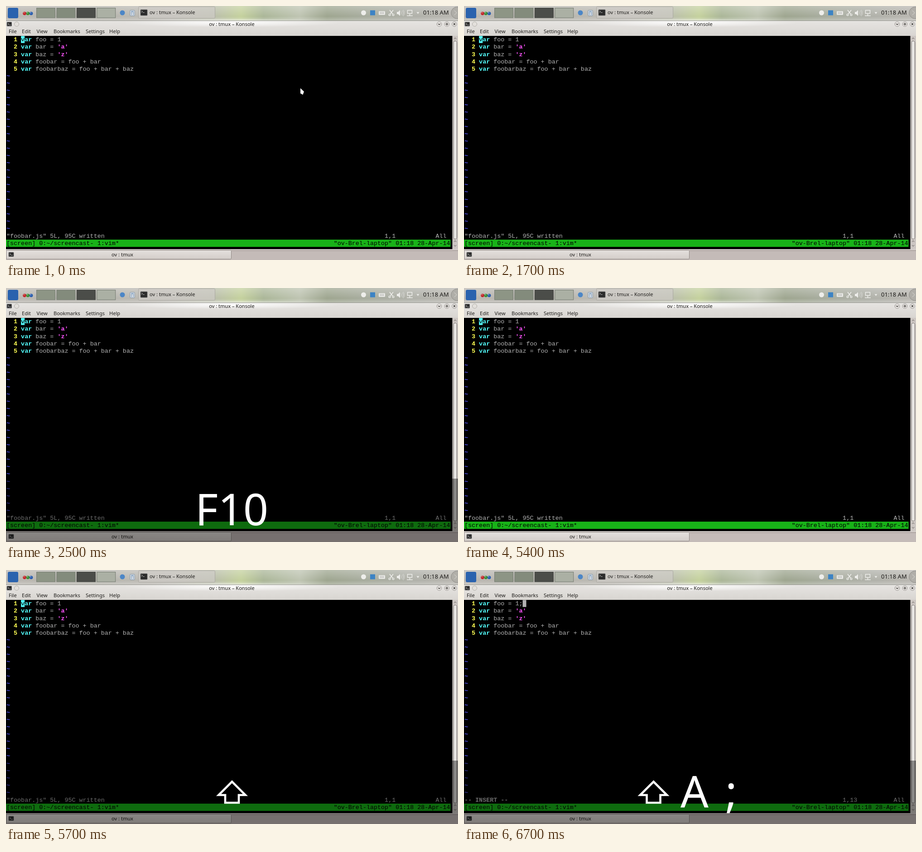
Write an HTML page that moves like this. It is 998 by 561 pixels and loops after 8 s.

```html
<!DOCTYPE html>
<html lang="en">
<head>
<meta charset="utf-8">
<title>Terminal screencast</title>
<style>
  html, body { margin: 0; width: 100%; height: 100%; overflow: hidden; background: #000; }
  svg { display: block; width: 100vw; height: 100vh; }
  text { white-space: pre; }
  .ui { font: 11.05px "Noto Sans", "Open Sans", sans-serif; fill: #1c1a18; }
  .term { font: 13.383px "Liberation Mono", "DejaVu Sans Mono", monospace; fill: #b2b2b2; }
  .key { font: 97px "Noto Sans", "Open Sans", sans-serif; fill: #fff; }
  .b { font-weight: bold; }
</style>
</head>
<body>
<svg id="stage" viewBox="0 0 998 561" preserveAspectRatio="none">
  <defs>
    <linearGradient id="panel">
      <stop offset="0" stop-color="#b9b5af"/>
      <stop offset=".2" stop-color="#b5b4ac"/>
      <stop offset=".36" stop-color="#bdbab4"/>
      <stop offset=".46" stop-color="#b9bda9"/>
      <stop offset=".52" stop-color="#c3d09b"/>
      <stop offset=".57" stop-color="#a9b596"/>
      <stop offset=".65" stop-color="#bdc3b0"/>
      <stop offset=".71" stop-color="#9ca48d"/>
      <stop offset=".79" stop-color="#a5aa9b"/>
      <stop offset=".9" stop-color="#aeafa7"/>
      <stop offset="1" stop-color="#b9b6b0"/>
    </linearGradient>
    <linearGradient id="shade" x2="0" y2="1">
      <stop offset="0" stop-color="#fff" stop-opacity=".28"/>
      <stop offset=".7" stop-color="#fff" stop-opacity=".02"/>
      <stop offset="1" stop-color="#fff" stop-opacity=".3"/>
    </linearGradient>
    <linearGradient id="frame" x2="0" y2="1">
      <stop offset="0" stop-color="#e6e4e1"/>
      <stop offset="1" stop-color="#d8d5d1"/>
    </linearGradient>
    <radialGradient id="glow">
      <stop offset="0" stop-color="#fff" stop-opacity=".9"/>
      <stop offset="1" stop-color="#fff" stop-opacity="0"/>
    </radialGradient>
    <linearGradient id="tab" x2="0" y2="1">
      <stop offset="0" stop-color="#e4e0dd"/>
      <stop offset="1" stop-color="#d3cdc9"/>
    </linearGradient>
    <linearGradient id="slider">
      <stop offset="0" stop-color="#d8d4d0"/>
      <stop offset=".5" stop-color="#f0eeec"/>
      <stop offset="1" stop-color="#d2cdc8"/>
    </linearGradient>
  </defs>
  <g id="desk"></g>
  <g id="term"></g>
  <path id="pointer" d="M650 181.500L658 189 655.500 196 650 193Z" fill="#f4f4f4"/>
  <g id="keys"></g>
</svg>
<script>
const LOOP = 8000;
const COL = 8.03, ROW = 16.05;
const YELLOW = '#ffff54', CYAN = '#54ffff', PINK = '#ff54ff', BLUE = '#5454ff', GREY = '#b2b2b2';
const $ = id => document.getElementById(id);

function add(parent, tag, attrs, content) {
  const el = document.createElementNS('http://www.w3.org/2000/svg', tag);
  for (const k in attrs) el.setAttribute(k, attrs[k]);
  if (content !== undefined) el.textContent = content;
  parent.appendChild(el);
  return el;
}
const rect = (p, x, y, width, height, fill, more) =>
  add(p, 'rect', { x, y, width, height, fill, ...more });
const dot = (p, cx, cy, r, fill, more) => add(p, 'circle', { cx, cy, r, fill, ...more });
const line = (p, d, stroke, width = 1.2) =>
  add(p, 'path', { d, stroke, fill: 'none', 'stroke-width': width });
const label = (p, x, y, s, more) => add(p, 'text', { x, y, class: 'ui', ...more }, s);

// Text placed on the terminal's character grid
const cell = (p, col, row, s, fill = GREY, bold = false) =>
  add(p, 'text', {
    x: 1 + col * COL, y: 78.4 + row * ROW, class: bold ? 'term b' : 'term', style: `fill:${fill}`
  }, s);
const block = (p, col, fill) => rect(p, 1 + col * COL, 66.3, COL, 15.4, fill);

function termIcon(p, x, y, w, h) {
  rect(p, x, y, w, h, '#2b2b2b', { stroke: '#777', 'stroke-width': .8, rx: 1 });
  line(p, `M${x + 2} ${y + 2.5}l2.500 2-2.500 2m3.500 0h3`, '#ddd', .9);
}

function drawPanel(p) {
  rect(p, 0, 0, 998, 33, 'url(#panel)');
  rect(p, 0, 0, 998, 33, 'url(#shade)');
  rect(p, 4, 4, 23, 23, '#2a62ae', { rx: 3 });
  ['#c3272b', '#3c8f3a', '#2c5fae'].forEach((c, i) => {
    dot(p, 41 + i * 7.3, 16.5, 3.8, c);
    dot(p, 40 + i * 7.3, 15, 1.1, '#fff', { opacity: .6 });
  });
  ['#8d9585', '#838b7c', '#4b4d49', '#abb0a4'].forEach((c, i) =>
    rect(p, 67.5 + i * 44.4, 4.5, 41, 21.5, c, { stroke: i === 2 ? '#3b3d39' : '#747a70' }));
  dot(p, 257, 15, 5.5, '#4c86c6');
  rect(p, 274, 9.5, 10, 12, '#e2e5e8', { rx: 1, stroke: '#7890a8' });
  line(p, 'M276 12.500h6M276 15.500h2m2 0h2M276 18.500h2m2 0h2', '#5580ad', 1.5);
  rect(p, 292.5, 1.5, 169, 25.5, '#d0cdc8', { rx: 2, stroke: '#aaa8a1', 'fill-opacity': .65 });
  termIcon(p, 297, 8, 15, 13);
  label(p, 317, 18, 'ov : tmux – Konsole');

  const pale = '#eeeeeb';
  dot(p, 789.500, 15, 5.500, pale);
  rect(p, 804, 9.500, 11, 11, '#3c83c4');
  rect(p, 823, 11.5, 14, 8, pale, { rx: 1 });
  line(p, 'M825 14h10M825 16.500h10', '#a9aaa5', 1);
  line(p, 'M847 9l7 9M855 9l-7 9', pale, 1.6);
  [847, 855].forEach(x => dot(p, x, 19.5, 1.9, 'none', { stroke: pale, 'stroke-width': 1.3 }));
  add(p, 'path', { d: 'M863 13h3l4-4v13l-4-4h-3z', fill: pale });
  line(p, 'M872 12q3 3.500 0 7M874.500 10q5 5.500 0 11M877 8.500q5 7 0 14', '#dededb', 1);
  line(p, 'M886.500 9.500h10v7h-10zM891.500 16.500v5M885 21.500h13', pale, 1.5);
  add(p, 'path', { d: 'M906.500 13.500h6l-3 4z', fill: pale });
  label(p, 921, 19, '01:18 AM', { style: 'font-size:13px' });
  dot(p, 996, 15, 13, '#b0aea8', { stroke: '#8d8c87' });
  line(p, 'M990 10l5 5-5 5', '#cbc9c4');
}

function drawWindow(p) {
  rect(p, 0, 33, 998, 33, 'url(#frame)');
  add(p, 'ellipse', { cx: 498, cy: 37, rx: 240, ry: 10, fill: 'url(#glow)' });
  line(p, 'M0 32.500H998', '#85847e', .8);
  termIcon(p, 2, 35.5, 10.5, 9);
  dot(p, 23.5, 40, 5, '#e3e0dc', { stroke: '#aaa6a1', 'stroke-width': .9 });
  [956.5, 973.5, 990].forEach(x =>
    dot(p, x, 40, 5.2, '#e8e5e2', { stroke: '#8e8a86', 'stroke-width': .9 }));
  line(p, 'M954 39l2.500 2.500 2.500-2.500M973.500 37.800l2.200 2.200-2.200 2.200-2.200-2.200zM988 38l4 4m0-4l-4 4', '#34322f', 1.1);
  label(p, 498.5, 44.3, 'ov : tmux – Konsole', { 'text-anchor': 'middle' });
  [['File', 6], ['Edit', 35], ['View', 67.5], ['Bookmarks', 105], ['Settings', 176], ['Help', 228]]
    .forEach(([s, x]) => label(p, x, 60.3, s));

  rect(p, 0, 66, 986, 471, '#000');
  rect(p, 985.5, 66, 12.500, 471, '#cdc7c3');
  rect(p, 988, 77.5, 7.5, 437, 'url(#slider)', { rx: 3, stroke: '#77726e' });
  line(p, 'M989 73l2.700-2.700 2.700 2.700M989 521l2.700-2.700 2.700 2.700M989 528l2.700 2.700 2.700-2.700', '#8b8581');

  rect(p, 0, 537, 998, 24, '#c4bbb8');
  line(p, 'M0 537.500H998', '#e2ddda', 1);
  line(p, 'M498 540.500H998', '#a49b97', 1);
  rect(p, .5, 539.5, 497, 19.500, 'url(#tab)', { rx: 2, stroke: '#918a86' });
  termIcon(p, 6, 544, 11, 9.5);
  label(p, 257, 553.3, 'ov : tmux', { 'text-anchor': 'middle' });
}

function drawCode(p) {
  const code = ["foo = 1", "bar = 'a'", "baz = 'z'", 'foobar = foo + bar', 'foobarbaz = foo + bar + baz'];
  code.forEach((s, row) => {
    const [plain, quoted] = s.split(/(?=')(.*)/);
    cell(p, 2, row, row + 1, YELLOW, true);
    cell(p, 4, row, 'var', CYAN, true);
    cell(p, 8, row, plain);
    if (quoted) cell(p, 8 + plain.length, row, quoted, PINK, true);
  });
  for (let row = 5; row < 27; row++) cell(p, 0, row, '~', BLUE, true);
  cell(p, 118, 27, 'All');
  rect(p, 0, 516, 981.5, 16, '#18b218');
  cell(p, 0, 28, '[screen] 0:~/screencast- 1:vim*', '#000');
  cell(p, 90, 28, '"ov-Brel-laptop" 01:18 28-Apr-14', '#000');
}

// Editor views: normal mode, insert mode, insert mode after typing ";"
function drawModes(p) {
  return [0, 1, 2].map(mode => {
    const g = add(p, 'g', {});
    if (mode === 0) {
      block(g, 4, CYAN);
      cell(g, 4, 0, 'v', '#103c3c', true);
      cell(g, 0, 27, '"foobar.js" 5L, 95C written');
      cell(g, 104, 27, '1,1');
    } else {
      if (mode === 2) cell(g, 15, 0, ';');
      block(g, 14 + mode, GREY);
      cell(g, 0, 27, '-- INSERT --', GREY, true);
      cell(g, 104, 27, '1,' + (11 + mode));
    }
    return g;
  });
}

// Key display: Shift arrow by its centre, letters by their left edge
function drawKeys(p) {
  const views = [
    { text: [['F10', 498.5, 'middle']] },
    { arrow: 499, text: [] },
    { arrow: 450, text: [['A', 509.5]] },
    { arrow: 418.5, text: [['A', 478], [';', 577]] }
  ];
  return views.map(({ arrow, text }) => {
    const g = add(p, 'g', {});
    rect(g, 0, 421, 998, 140, '#000', { opacity: .4 });
    if (arrow) line(g, `M${arrow} 467.500l29.500 29.500h-14.500v17h-30v-17h-14.500z`, '#fff', 4.6);
    text.forEach(([s, x, anchor = 'start']) =>
      add(g, 'text', { x, y: 524, class: 'key', 'text-anchor': anchor }, s));
    return g;
  });
}

drawPanel($('desk'));
drawWindow($('desk'));
drawCode($('term'));
const modes = drawModes($('term'));
const keys = drawKeys($('keys'));

// start ms, editor view, key view (-1: none), pointer shown
const steps = [
  [0, 0, -1, true],
  [200, 0, -1, false],
  [2500, 0, 0, false],
  [5400, 0, -1, false],
  [5700, 0, 1, false],
  [5800, 1, 2, false],
  [6600, 2, 2, false],
  [6700, 2, 3, false]
];
const show = (el, on) => { el.style.display = on ? '' : 'none'; };

const begin = performance.now();
function tick() {
  const t = Math.max(0, performance.now() - begin) % LOOP;
  const [, mode, key, pointer] = steps.filter(s => s[0] <= t).pop();
  modes.forEach((g, i) => show(g, i === mode));
  keys.forEach((g, i) => show(g, i === key));
  show($('pointer'), pointer);
  requestAnimationFrame(tick);
}
tick();
</script>
</body>
</html>
```
